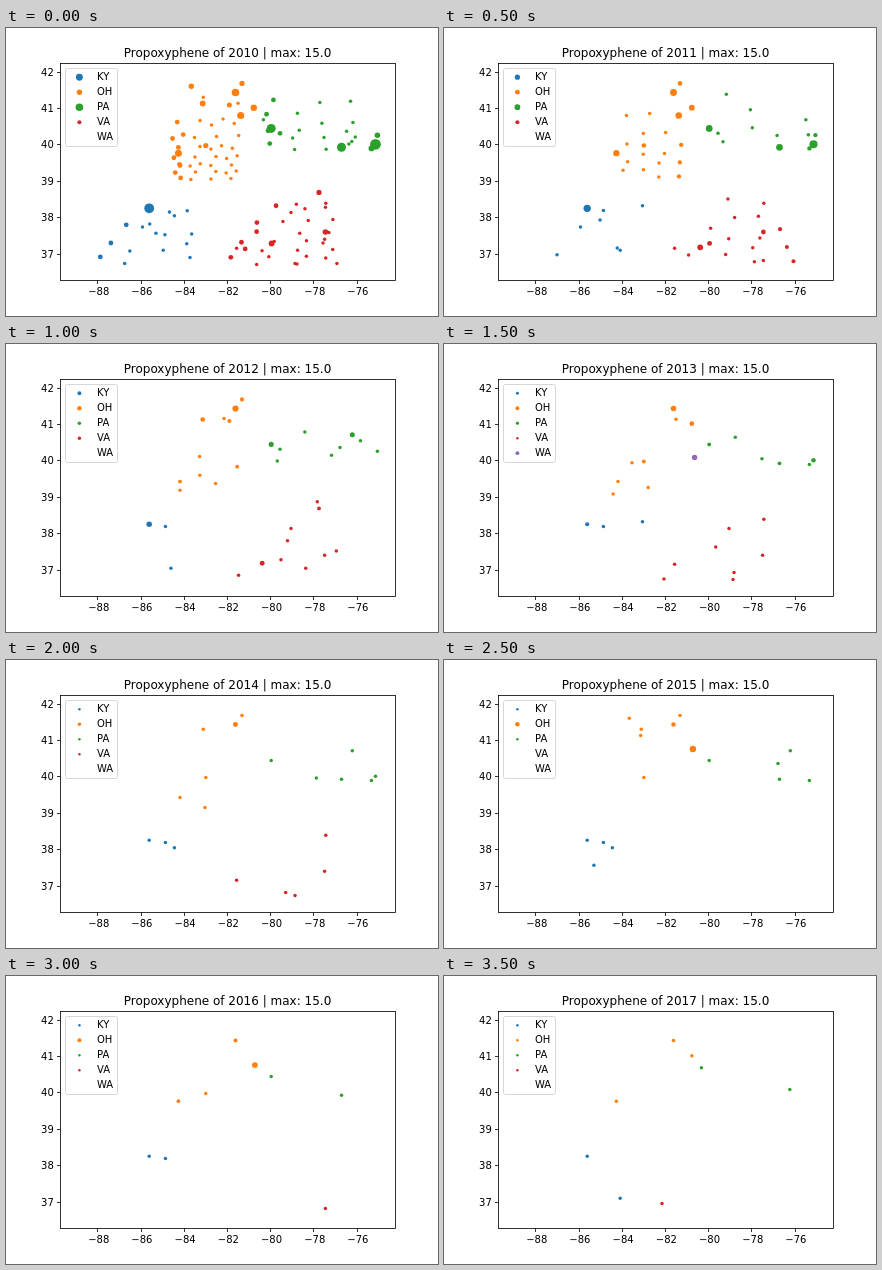
Write an HTML page with a canvas that moves like this. It is 432 px wide and 288 px high and loops after 4500 ms.

```html
<!DOCTYPE html>
<html lang="en">
<head>
<meta charset="utf-8">
<style>
html, body { margin: 0; width: 100%; height: 100%; overflow: hidden; background: #fff; }
canvas { display: block; }
</style>
</head>
<body>
<canvas id="chart" width="432" height="288"></canvas>
<script>
const ctx = document.getElementById('chart').getContext('2d');
const STEP = 500, LOOP = 4500, FIRST = 2010, YEARS = 8, MIN_R = 1.75;

// Every state has a few recurring places (x, y, last digits of the years seen, radius in the
// first year) and a cloud of small ones: `extra` dots inside `zone` (the x range at its top
// and bottom, then the y range). Each year radii shrink by `fade` and the cloud by `thin`.
const states = [
  { name: 'KY', color: '#1f77b4', fade: 0.75, extra: 13, thin: 0.3,
    zone: { top: [162, 182], bottom: [80, 215], y: [153, 236] },
    places: [
      [143.2, 180.3, '01234567', 4.9], [159.4, 182.4, '123456'], [168.4, 187.8, '045'],
      [149.9, 205.2, '05'], [136.5, 199, '01'], [198.5, 177.8, '13'], [176.2, 222.3, '17'],
    ] },
  { name: 'OH', color: '#ff7f0e', fade: 0.9, extra: 34, thin: 0.45,
    zone: { top: [165, 250], bottom: [165, 235], y: [64, 152] },
    places: [
      [229.5, 64.5, '01234567', 3.8], [247.8, 79.7, '0137', 3.2], [172.4, 125.2, '0167', 3.5],
      [199.8, 117.5, '013456', 2.6], [236, 55.4, '01245', 2.6], [174, 137.6, '0234', 2.4],
      [223.4, 77, '02', 2.5], [197.3, 69.3, '045'], [248.9, 89, '56', 5.4],
      [185.3, 58.2, '05', 2.7], [196.7, 75.5, '025', 2.9], [232, 75.3, '03'],
      [234.7, 87.5, '01', 3.6],
    ] },
  { name: 'PA', color: '#2ca02c', fade: 0.75, extra: 17, thin: 0.5,
    zone: { top: [260, 366], bottom: [257, 368], y: [46, 122] },
    places: [
      [265.2, 100.4, '0123456', 4.5], [335.5, 119.3, '013456', 4.5], [369.5, 116.3, '0134', 5.4],
      [365.4, 120.4, '01345', 2.9], [346.3, 90.7, '245', 4.5], [371.4, 107.2, '012', 2.8],
      [274, 105.3, '012', 2.4], [334, 103.6, '25'], [257.4, 91.8, '07'], [345.8, 113.4, '07'],
    ] },
  { name: 'VA', color: '#d62728', fade: 0.85, extra: 26, thin: 0.5,
    zone: { top: [293, 324], bottom: [210, 352], y: [147, 237] },
    places: [
      [319.8, 175.3, '0134'], [285, 184.5, '023'], [318.6, 211.3, '0234'], [289, 235.4, '034'],
      [230.6, 220.3, '0134'], [265.6, 215.4, '01', 2.9], [313, 164.4, '02', 2.6],
      [256.2, 219.3, '12', 3.4], [319.4, 204, '01', 2.8], [319.4, 232.4, '16'],
      [218, 227.5, '7'],
    ] },
  { name: 'WA', color: '#9467bd', fade: 1, extra: 0, thin: 1,
    places: [[250.6, 113.4, '3', 2.7]] },
];

const mix = (a, b, t) => a + (b - a) * t;

// Low-discrepancy sequence: evenly spread, repeatable positions
function scatter({ top, bottom, y }, i) {
  const u = i * 0.7549 % 1, v = Math.sqrt(i * 0.5698 % 1);
  return [mix(mix(top[0], bottom[0], v), mix(top[1], bottom[1], v), u), mix(y[0], y[1], v)];
}

function dotsOf({ places, zone, extra, fade, thin }, t) {
  const radius = (peak = 0) => Math.max(MIN_R, peak * fade ** t);
  const dots = places.filter(p => p[2].includes(t)).map(([x, y, , peak]) => [x, y, radius(peak)]);
  const count = Math.floor(extra * thin ** t);
  for (let i = 1; i <= count; i++) {
    dots.push([...scatter(zone, i + 37 * t), radius(i % 4 ? 0 : 2.4)]);
  }
  return dots;
}

function disc(x, y, r, color) {
  ctx.fillStyle = color;
  ctx.beginPath();
  ctx.arc(x, y, r, 0, 2 * Math.PI);
  ctx.fill();
}

function label(text, x, y, align = 'center', size = 10) {
  ctx.font = `${size}px "DejaVu Sans", sans-serif`;
  ctx.textAlign = align;
  ctx.fillStyle = '#000';
  ctx.fillText(text, x, y);
}

function line(x1, y1, x2, y2) {
  ctx.beginPath();
  ctx.moveTo(x1, y1);
  ctx.lineTo(x2, y2);
  ctx.stroke();
}

function drawAxes() {
  const snap = v => Math.floor(v) + 0.5;
  ctx.strokeStyle = '#000';
  ctx.lineWidth = 0.8;
  ctx.strokeRect(54.5, 35.5, 335, 217);
  for (let lon = -88; lon <= -76; lon += 2) {
    const x = 264.7 + (lon + 80) * 21.6;
    line(snap(x), 252.5, snap(x), 256);
    label('\u2212' + -lon, x + 0.8, 267);
  }
  for (let lat = 37; lat <= 42; lat++) {
    const y = 44 + (42 - lat) * 36.4;
    line(51, snap(y), 54.5, snap(y));
    label(lat, 47.8, Math.round(y + 3.5), 'right');
  }
}

function drawLegend(clouds) {
  ctx.beginPath();
  ctx.roundRect(59.5, 40.5, 52, 78, 2);
  ctx.fillStyle = 'rgba(255,255,255,0.8)';
  ctx.fill();
  ctx.strokeStyle = 'rgba(204,204,204,0.8)';
  ctx.lineWidth = 1;
  ctx.stroke();
  states.forEach(({ name, color }, i) => {
    const largest = Math.max(0, ...clouds[i].map(d => d[2]));
    disc(73.4, 49.2 + i * 15, largest * Math.SQRT1_2, color);
    label(name, 91, 52 + i * 15, 'left');
  });
}

function draw(ms) {
  const t = Math.min(YEARS - 1, Math.floor(ms % LOOP / STEP));
  const clouds = states.map(s => dotsOf(s, t));
  ctx.fillStyle = '#fff';
  ctx.fillRect(0, 0, 432, 288);
  clouds.forEach((dots, i) => dots.forEach(d => disc(...d, states[i].color)));
  drawAxes();
  drawLegend(clouds);
  label(`Propoxyphene of ${FIRST + t} | max: 15.0`, 221.5, 29, 'center', 12);
}

let start;
function tick(now) {
  start ??= now;
  draw(now - start);
  requestAnimationFrame(tick);
}
draw(0);
requestAnimationFrame(tick);
</script>
</body>
</html>
```
